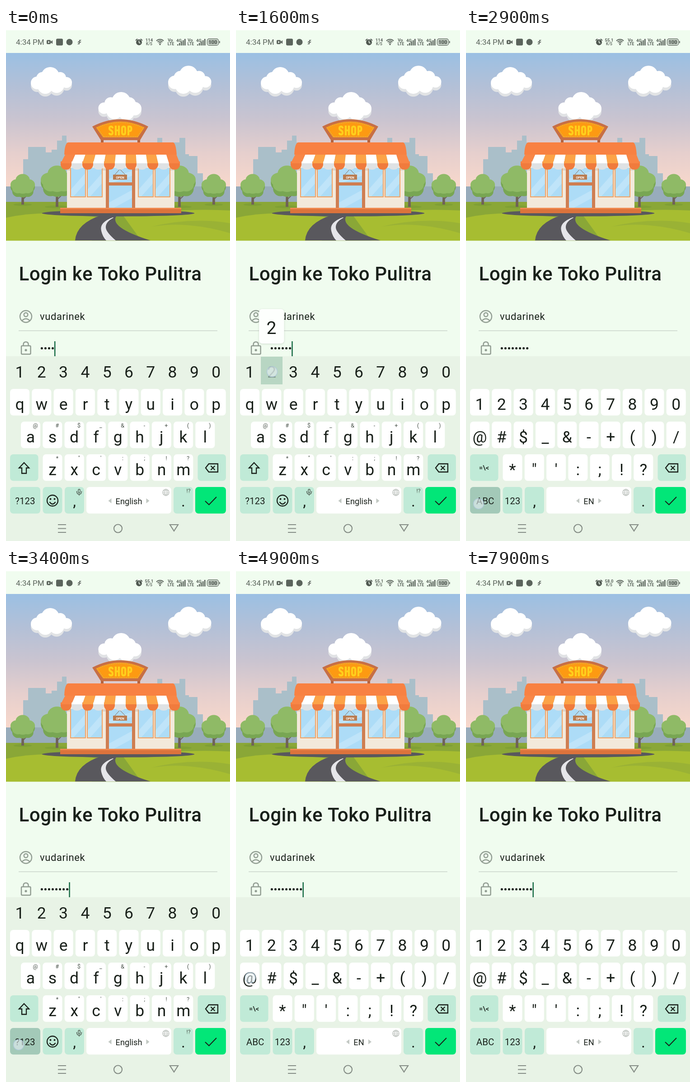
These frames come from a looping animation (496 by 1130 pixels, 8 s). An HTML page with a canvas:

```html
<!DOCTYPE html>
<html lang="id">
<head>
<meta charset="utf-8">
<title>Login</title>
<style>
html, body { margin: 0; width: 100%; height: 100%; overflow: hidden; background: #f0fcef; }
canvas { display: block; width: 496px; height: 1130px; }
</style>
</head>
<body>
<canvas id="stage" width="496" height="1130"></canvas>
<script>
const W = 496, H = 1130, LOOP = 8000;
const INK = '#19201a', GREY = '#5b645c', MINT = '#c0ead7', PANEL = '#e8f3e6', PAPER = '#f0fcef';
const stage = document.getElementById('stage').getContext('2d');
let g = stage;

function fill(color, d) { g.fillStyle = color; g.fill(new Path2D(d)); }
function line(color, width, d) {
  g.strokeStyle = color;
  g.lineWidth = width;
  g.stroke(new Path2D(d));
}
function rect(color, x, y, w, h, r = 0) {
  g.fillStyle = color;
  g.beginPath();
  g.roundRect(x, y, w, h, r);
  g.fill();
}
function frame(color, width, x, y, w, h, r) {
  g.strokeStyle = color;
  g.lineWidth = width;
  g.beginPath();
  g.roundRect(x, y, w, h, r);
  g.stroke();
}
function disc(color, x, y, rx, ry = rx) {
  g.fillStyle = color;
  g.beginPath();
  g.ellipse(x, y, rx, ry, 0, 0, Math.PI * 2);
  g.fill();
}
function ring(color, width, x, y, r, from = 0, to = Math.PI * 2) {
  g.strokeStyle = color;
  g.lineWidth = width;
  g.beginPath();
  g.arc(x, y, r, from, to);
  g.stroke();
}
function text(str, x, y, size, { color = INK, weight = 400, align = 'center', spacing = 0 } = {}) {
  g.font = `${weight} ${size}px Roboto, sans-serif`;
  g.letterSpacing = spacing + 'px';
  g.textAlign = align;
  g.fillStyle = color;
  g.fillText(str, x, y);
  g.letterSpacing = '0px';
}

// ---- shop illustration ----

function cloud(x, y, s, dir = 1) {
  const puffs = [[43, 20, 20], [26, 25, 14], [14, 35, 14], [32, 42, 17], [57, 40, 17], [65, 24, 13], [79, 34, 12]];
  for (const [color, dy] of [['#e1e3e5', 6], ['#fff', 0]])
    for (const [px, py, r] of puffs) disc(color, x + px * s * dir, y + (py + dy) * s, r * s);
}

function tree(x, y, r, base) {
  disc('#7f9f35', x, base, r * .75, 3);
  fill('#6f6257', `M${x - 3} ${base}L${x - 2} ${y}H${x + 2}L${x + 3} ${base}Z`);
  line('#6f6257', 2, `M${x} ${y + r * 1.15}l${r * .4} ${-r * .4}`);
  const lumps = [[0, -.45, .58], [-.5, -.02, .5], [.5, -.02, .5], [0, .25, .6], [-.4, .35, .46], [.42, .35, .46]];
  for (const [color, dy, squash] of [['#78a653', .12, 1], ['#8fba66', -.06, .86]])
    for (const [dx, ly, k] of lumps) disc(color, x + dx * r, y + (ly * squash + dy) * r, k * r, k * r * squash);
}

function skyline() {
  fill('#aabfc9', 'M38 390V289H49V262H88V274H101V268H113V248H124V237H134V252H335V242H346V252H384V242H397V278H405V282H424V320H436V390Z');
  fill('#98acbb', 'M0 390V349H496V390Z');
}

function ground() {
  rect('#8aa737', 0, 383, W, 86);
  fill('#a7bd31', 'M0 418Q90 398 210 418L190 469H0Z');
  fill('#a7bd31', 'M260 414Q390 396 496 402V469H300Z');
  fill('#9ab235', 'M320 438Q410 416 496 430V452Q400 424 320 438Z');
  disc('#59585d', 248.5, 408, 169, 7);
  fill('#59585d', 'M212 412Q156 430 153 468H320Q224 438 246 412Z');
  fill('#e6e6ea', 'M237 417Q206 428 211 447Q214 460 222 468H243Q222 450 221 440Q220 427 238 418Z');
}

function glass(x, y, w, h) {
  g.save();
  g.beginPath();
  g.rect(x, y, w, h);
  g.clip();
  rect('#addcf7', x, y, w, h);
  fill('#bfe4f9', `M${x} ${y + h * .75}L${x + w} ${y + h * .2}V${y + h * .55}L${x} ${y + h * 1.1}Z`);
  g.restore();
}

function signLetters() {
  g.lineJoin = 'round';
  line('#ffcf1b', 4.2, 'M236 221Q236 217 232.5 217T229 221Q229 224 232.5 225.5T236 231Q236 234.5 232.5 234.5T229 231'
    + 'M243 215V236.5M250 215V236.5M243 225.5H250'
    + 'M257 221Q257 217 260.5 217T264 221V230Q264 234.5 260.5 234.5T257 230Z'
    + 'M271 236.5V217H274Q277.5 217 277.5 222T274 227H271');
  g.lineJoin = 'miter';
}

function shopSign() {
  rect('#b4633f', 210, 244, 6, 10);
  rect('#b4633f', 291, 244, 6, 10);
  fill('#c76f45', 'M191 217Q253 185 315 217L297 247H210Z');
  fill('#fd9a12', 'M199 219Q253 193 307 219L292 241H215Z');
  g.setLineDash([2, 2]);
  line('#d9b552', 1.5, 'M202 220Q253 196 304 220L291 239.5H216Z');
  g.setLineDash([]);
  signLetters();
}

function awning() {
  for (let i = 0; i < 11; i++) {
    const x = 121 + i * 24, top = 131 + i * 22.4, orange = i % 2 === 0;
    const edge = i === 0 || i === 10;
    const [light, dark] = orange ? [edge ? '#f88646' : '#fca347', '#f07b3d'] : ['#fff', '#dfe2e4'];
    fill(dark, `M${x} 294H${x + 24}V302Q${x + 22} 312 ${x + 12} 312T${x} 302Z`);
    fill(light, `M${top} 279H${top + 22.4}L${x + 24} 298H${x}Z`);
  }
}

function shop() {
  shopSign();
  rect('#f3e9db', 135, 300, 238, 98);
  rect('#dfd3c5', 135, 309, 238, 5);
  for (const x of [142, 179, 292, 329]) {
    rect('#f2a160', x, 308, 35, 65);
    glass(x + 2, 308, 31, 63);
  }
  rect('#cf7e51', 221, 308, 65, 90);
  glass(228, 308, 51, 32);
  glass(228, 347, 51, 50);
  line('#8c6045', 1, 'M240 324L252 311L265 324');
  rect('#b97c50', 237, 323, 31, 11);
  text('OPEN', 252.5, 331.5, 7, { color: '#fff', weight: 700 });
  fill('#f88142', 'M138 252H370Q376 253 378 279H129Q130 253 138 252Z');
  awning();
  rect('#dc733c', 120, 396, 268, 12);
  rect('#f08a50', 120, 396, 268, 3);
}

function illustration() {
  const sky = g.createLinearGradient(0, 55, 0, 350);
  const tones = ['#9bc0e3', '#b3c0d7', '#cac4d0', '#e6cfcd', '#f8d8cb'];
  tones.forEach((tone, i) => sky.addColorStop(i / 4, tone));
  g.fillStyle = sky;
  g.fillRect(0, 55, W, 340);
  skyline();
  cloud(55, 86, 1);
  cloud(359, 83, 1.05);
  cloud(300, 141, 1.05, -1);
  ground();
  tree(37, 347, 27, 389);
  tree(113, 337, 36, 394);
  tree(384, 337, 36, 394);
  tree(460, 347, 27, 389);
  shop();
  rect(PAPER, 0, 468.5, W, 260);
}

// ---- status bar and form ----

function statusBar() {
  rect('#fff', 0, 0, W, 5);
  text('4:34 PM', 22, 37, 17, { color: GREY, align: 'left' });
  rect(GREY, 90, 26.5, 9, 9, 2);
  fill(GREY, 'M98 31L103 27V35Z');
  disc(PAPER, 94.5, 31, 1.7);
  rect(GREY, 111, 23.5, 15, 15, 3);
  disc(GREY, 140.5, 31, 7);
  line(GREY, 1.5, 'M162 27H165L160 31H165L160 35H163');

  disc('#4f5850', 294.5, 31.5, 6.5);
  line('#4f5850', 1.8, 'M287 27.5L291 24M302 27.5L298 24');
  line(PAPER, 1.4, 'M294.5 27.5V32L297.5 33.5');
  text('K/S', 317, 38, 8.5, { color: GREY, weight: 500 });
  for (const r of [4, 7.5, 11]) ring(GREY, 1.8, 341, 36, r, -Math.PI * .76, -Math.PI * .24);
  disc(GREY, 341, 36, 1.8);
  for (const x of [365, 409]) {
    text('Vo', x - 1, 30, 9.5, { color: GREY, weight: 700 });
    text('LTE', x, 38, 9, { color: GREY, weight: 700 });
    text('4G', x + 18, 31, 9.5, { color: GREY, weight: 700 });
    for (let i = 0; i < 5; i++) rect(GREY, x + 14 + i * 4, 36 - i * 3, 2.6, 2.5 + i * 3);
  }
  frame(GREY, 1.3, 445.5, 24, 25, 14, 4);
  rect('#a9b2aa', 447.5, 26, 21, 10, 2);
  rect(GREY, 472, 28.5, 1.8, 5, 1);
  text('100', 458, 35, 11, { color: '#465047', weight: 500 });
}

function form() {
  text('Login ke Toko Pulitra', 28.5, 556, 42, { weight: 500, align: 'left', spacing: .55 });
  const icon = '#929d93';
  ring(icon, 2.4, 44, 635.5, 13);
  ring(icon, 2.4, 44, 631.5, 4.3);
  line(icon, 2.4, 'M35 645Q44 636 53 645');
  text('vudarinek', 75, 643, 22, { align: 'left', spacing: .6 });
  rect('#cbd5cb', 28, 666, 440, 1.6);
  frame(icon, 2.5, 34, 700, 20.5, 18.5, 2);
  line(icon, 2.5, 'M38.5 700V697Q38.5 691.5 44 691.5T49.5 697V700');
  disc(icon, 44, 709.5, 2.6);
}

function navBar() {
  const c = '#858d86';
  line(c, 2.2, 'M115 1094H133M115 1102.5H133M115 1111H133');
  ring(c, 2.2, 248, 1102.5, 9);
  line(c, 2.2, 'M363 1094H381L372 1108Z');
}

// ---- keyboard ----

const ROWS = [724, 795, 867, 939, 1011];
const PITCH = 48.3, KEY_W = 43, KEY_H = 58.5;
const colX = (i, start = 9) => start + i * PITCH;

function key(x, row, label, hint) {
  const y = ROWS[row];
  rect('#fff', x, y, KEY_W, KEY_H, 7);
  text(label, x + KEY_W / 2, y + 45.5, 35.5);
  if (hint) text(hint, x + 32, y + 13, 12.5, { color: '#4a544b' });
}
function keyRow(labels, row, start, hints = '') {
  [...labels].forEach((label, i) => key(colX(i, start), row, label, hints[i]));
}
function wideKey(x, row, w, color, label = '', size = 20, baseline = 37.5) {
  rect(color, x, ROWS[row], w, KEY_H, 7);
  text(label, x + w / 2, ROWS[row] + baseline, size);
}

function arrows(left, right) {
  fill('#c2c8c3', `M${left + 3} 1036V1047L${left - 4} 1041.5ZM${right - 3} 1036V1047L${right + 4} 1041.5Z`);
}

function commonKeys(fnLabel, language, gap, fnDown) {
  wideKey(9, 4, 67, fnDown ? '#a3c9b8' : MINT, fnLabel, 20.5);
  wideKey(178, 4, 188, '#fff', language, 18.2);
  arrows(272 - gap, 272 + gap);
  const globe = '#b9bfba';
  ring(globe, 1.3, 354, 1023, 7);
  line(globe, 1.1, 'M347 1023H361M348.5 1019.5H359.5M348.5 1026.5H359.5M354 1016Q347.5 1023 354 1030Q360.5 1023 354 1016');
  wideKey(130, 4, KEY_W, MINT, ',', 34, 42.5);
  wideKey(371, 4, KEY_W, MINT, '.', 34, 42.5);
  wideKey(424.5, 3, 62.5, MINT);
  line(INK, 2.3, 'M442 969L449 960H469V978H449ZM453.5 964.5L462.5 973.5M462.5 964.5L453.5 973.5');
  wideKey(419, 4, 68, '#02e678');
  line(INK, 2, 'M441 1042L449.5 1050L466 1033');
}

function letterKeys(fnDown) {
  [...'1234567890'].forEach((n, i) => text(n, colX(i) + 21.5, 769.5, 35.5));
  keyRow('qwertyuiop', 1, 9);
  keyRow('asdfghjkl', 2, 33, '@#$_&-+()');
  keyRow('zxcvbnm', 3, 81.5, '*"\':;!?');
  wideKey(9, 3, 62.5, MINT);
  line(INK, 2.3, 'M40 957.5L51 969H45V981H35V969H29Z');
  wideKey(81.5, 4, KEY_W, MINT);
  ring(INK, 2.3, 103, 1041, 12);
  disc(INK, 98.5, 1037.5, 2);
  disc(INK, 107.5, 1037.5, 2);
  line(INK, 2.3, 'M96.5 1044Q103 1053 109.5 1044');
  commonKeys('?123', 'English', 41.5, fnDown);
  line('#4a544b', 1.4, 'M160 1018Q160 1016 162 1016T164 1018V1022Q164 1024 162 1024T160 1022ZM156.5 1020Q156.5 1027 162 1027T167.5 1020M162 1027V1030');
  text('!?', 404, 1024, 12.5, { color: '#4a544b' });
}

function symbolKeys(fnDown) {
  keyRow('1234567890', 1, 9);
  keyRow('@#$_&-+()/', 2, 9);
  keyRow('*"\':;!?', 3, 81.5);
  wideKey(9, 3, 62.5, MINT);
  text('=\\<', 40, 974, 15, { weight: 500 });
  wideKey(81.5, 4, KEY_W, MINT, '123', 20.5);
  commonKeys('ABC', 'EN', 24, fnDown);
}

// ---- timeline ----

// A key is held from down to up; the touch dot lingers until gone.
const TAPS = [
  { down: 200, up: 400, gone: 600, label: 'n', x: 323, row: 3 },
  { down: 1300, up: 1300, gone: 1500, label: '1', x: 14, row: 0 },
  { down: 1600, up: 1800, gone: 1900, label: '2', x: 57.5, row: 0 },
  { down: 1900, up: 2200, gone: 2300, label: '3', x: 105.5, row: 0 },
  { down: 2900, up: 3100, gone: 3200, fn: true },
  { down: 3300, up: 3500, gone: 3700, fn: true },
  { down: 3900, up: 4100, gone: 4300, fn: true },
  { down: 4700, up: 4900, gone: 5100, label: '@', x: 9, row: 2 }
];
const TYPED = [400, 1400, 1800, 2200, 4900];
const CARET_ON = [[0, 900], [1400, 2600], [3100, 3600], [4100, 4600], [4900, 5400], [5900, 6300], [6900, 7400], [7900, 8000]];
const within = (t, from, to) => t >= from && t < to;

function password(t) {
  const count = 4 + TYPED.filter(at => t >= at).length;
  for (let i = 0; i < count; i++) disc(INK, 79.3 + i * 8.05, 705.5, 2.5);
  if (CARET_ON.some(([from, to]) => within(t, from, to))) rect('#1d6f49', 74.5 + count * 8.1, 690, 2.6, 33);
}

function pressedKey({ label, x, row }) {
  const y = ROWS[row], mid = x + KEY_W / 2;
  if (row === 0) rect('#b8d6c3', mid - 24, y, 48, 61);
  else rect('#c3dccd', x, y, KEY_W, KEY_H, 7);
  text(label, mid, y + 45.5, 35.5, { color: '#7d9486' });
  const left = Math.max(5, mid - 28);
  g.save();
  g.shadowColor = 'rgba(0,0,0,.14)';
  g.shadowBlur = 4;
  g.shadowOffsetY = 1;
  rect('#fdfffd', left, y - 105, 55.5, 76, 7);
  g.restore();
  text(label, left + 27.5, y - 50, 39);
}

function touchDot(tap) {
  const x = tap.fn ? 28 : tap.x + 22.5;
  const y = tap.fn ? 1048 : ROWS[tap.row] + 33;
  disc('rgba(228,238,242,.6)', x, y, 12);
  ring('rgba(160,190,215,.6)', 1.5, x, y, 11.5);
}

function makeBackdrop() {
  const canvas = document.createElement('canvas');
  canvas.width = W;
  canvas.height = H;
  g = canvas.getContext('2d');
  rect(PAPER, 0, 0, W, H);
  illustration();
  statusBar();
  form();
  g = stage;
  return canvas;
}

function draw(t) {
  g.drawImage(backdrop, 0, 0);
  const speed = t < 2300 ? '114' : t < 7100 ? '55.1' : '58.0';
  text(speed, 317, 30, 9.5, { color: GREY, weight: 700 });
  password(t);
  rect(PANEL, 0, 723, W, H - 723);
  const tap = TAPS.find(p => within(t, p.down, p.gone));
  const held = tap && t < tap.up;
  const symbols = within(t, 2900, 3300) || t >= 3900;
  (symbols ? symbolKeys : letterKeys)(held && tap.fn);
  navBar();
  if (held && !tap.fn) pressedKey(tap);
  if (tap) touchDot(tap);
}

const backdrop = makeBackdrop();
const start = performance.now();
function tick() {
  draw((performance.now() - start) % LOOP);
  requestAnimationFrame(tick);
}
tick();
</script>
</body>
</html>
```
